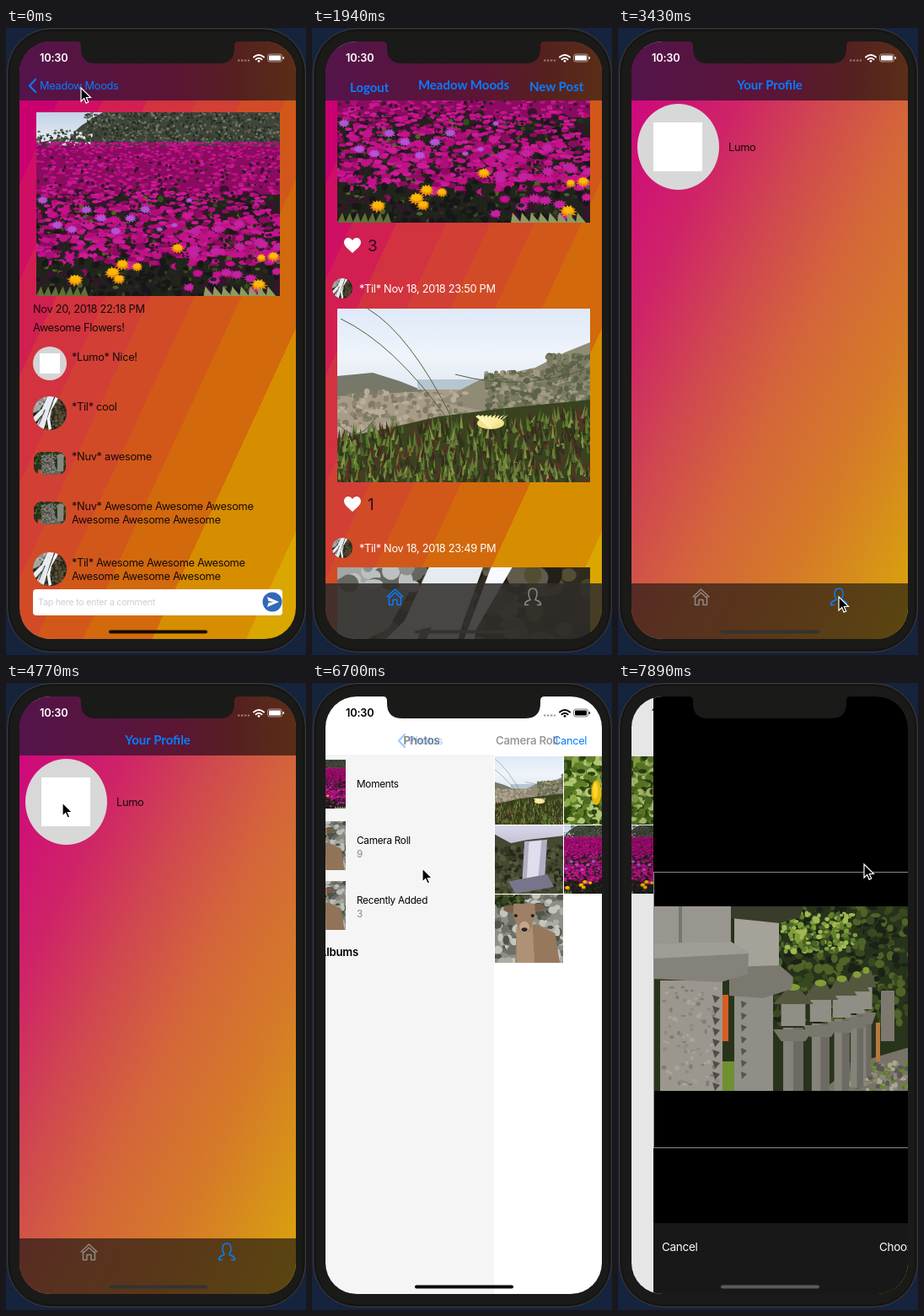
Write an HTML page with a canvas that moves like this. It is 356 px wide and 744 px high and loops after 8000 ms.

```html
<!DOCTYPE html>
<html lang="en">
<head>
<meta charset="utf-8">
<title>Photo app walkthrough</title>
<style>
html, body { margin: 0; width: 100%; height: 100%; overflow: hidden; background: #15233d; }
#stage { position: relative; width: 356px; height: 744px; overflow: hidden; font-family: Inter, Roboto, sans-serif; }
#stage div, svg, canvas { position: absolute; }
#stage div, svg { left: 0; top: 0; width: 356px; height: 744px; }
svg { overflow: visible; }
text { font-size: 12.8px; letter-spacing: -.3px; }
.bold { font-size: 13.2px; font-weight: 600; letter-spacing: -.2px; }
.row { font-size: 11.8px; }
.hand { font: 700 15px Lato, sans-serif; letter-spacing: 0; fill: #087cff; }
.blue { fill: #087cff; }
.mid { text-anchor: middle; }
.line { fill: none; stroke: currentColor; stroke-linecap: round; stroke-linejoin: round; }
.round { border-radius: 50%; }
.pill { border-radius: 9px; }

#screen { clip-path: inset(16px 12px 19px 16px round 37px); background: #000; }
#screen .view { clip-path: inset(16px 12px 0 16px); }
.warm { background: linear-gradient(to bottom right, #cb0070 12%, #cf0f63 0 20%, #d21f52 0 28%, #d2333f 0 37%, #d23f35 0 45%, #d24b27 0 53%, #d2581a 0 61.5%, #d2690c 0 74%, #d78d00 0 91%, #daa600 0) 16px 16px / 328px 709px no-repeat; }
.soft { background: linear-gradient(to bottom right, #cf0a7c 6%, #cf2368 24%, #d0484f 40%, #d4663a 56%, #d57a28 74%, #d9a80a) 16px 16px / 328px 709px no-repeat; }
.white { background: #fff; }

#feed, #detail, #profile, #back, #feedNav, #profNav, #tabs, #home, #user, #picker, #list, #roll, #listNav, #rollNav, #crop, #time, #icons, #bar, #cursor {
  animation: 8s step-end infinite;
}
#detail { animation-name: detail; }
#feed { animation-name: feed; }
#profile { animation-name: profile; }
#back { animation-name: back; }
#feedNav { animation-name: feedNav; }
#profNav { animation-name: profile; }
#tabs { animation-name: tabs; }
#home { animation-name: home; }
#user { animation-name: user; }
#picker { animation-name: picker; }
#list { animation-name: list; }
#roll { animation-name: roll; }
#listNav { animation-name: listNav; }
#rollNav { animation-name: rollNav; }
#crop { animation-name: crop; }
#time { animation-name: time; }
#icons { animation-name: icons; }
#bar { animation-name: bar; }
#cursor { animation-name: cursor; }

@keyframes detail {
  0% { transform: none; }
  18.6% { transform: translateX(28px); }
  20.45% { transform: translateX(215px); }
  22.3% { transform: translateX(308px); }
  24.2%, 100% { transform: translateX(340px); visibility: hidden; }
}
@keyframes feed {
  0%, 18.6% { transform: translateX(-90px); filter: brightness(.9); }
  20.45% { transform: translateX(-33px); filter: brightness(.95); }
  22.3% { transform: translateX(-6px); filter: none; }
  24.2%, 100% { transform: none; filter: none; }
}
@keyframes profile { 0% { visibility: hidden; } 42.8%, 100% { visibility: visible; } }
@keyframes back {
  0% { opacity: 1; transform: none; }
  18.6% { opacity: .4; transform: translateX(5px); }
  20.45%, 100% { opacity: 0; transform: translateX(40px); }
}
@keyframes feedNav {
  0% { opacity: 0; }
  18.6% { opacity: .05; }
  20.45% { opacity: .65; }
  22.3% { opacity: 1; }
  42.8%, 100% { opacity: 0; }
}
@keyframes tabs {
  0% { visibility: hidden; fill: rgba(48, 45, 43, .87); }
  18.6% { visibility: visible; fill: rgba(48, 45, 43, .87); }
  42.8%, 100% { visibility: visible; fill: rgba(30, 25, 20, .68); }
}
@keyframes home { 0% { color: #0a7cff; } 42.8%, 100% { color: #8f8983; } }
@keyframes user { 0% { color: #8f8983; } 42.8%, 100% { color: #0a7cff; } }
@keyframes picker {
  0% { visibility: hidden; }
  65.2% { visibility: visible; transform: translateY(640px); filter: none; }
  67.1% { visibility: visible; transform: translateY(270px); }
  68.85% { visibility: visible; transform: translateY(63px); }
  70.7% { visibility: visible; transform: translateY(8px); }
  72.6% { visibility: visible; transform: none; filter: none; }
  96.7% { visibility: visible; transform: translateX(-38px); filter: brightness(.96); }
  98.6%, 100% { visibility: visible; transform: translateX(-90px); filter: brightness(.9); }
}
@keyframes list {
  0% { transform: none; filter: none; }
  83.7% { transform: translateX(-38px); filter: brightness(.96); }
  85.6%, 100% { transform: translateX(-90px); filter: brightness(.9); }
}
@keyframes roll {
  0% { transform: translateX(340px); }
  83.7% { transform: translateX(200px); }
  85.6% { transform: translateX(26px); }
  87.45%, 100% { transform: none; }
}
@keyframes listNav {
  0% { opacity: 1; transform: none; }
  83.7% { opacity: .5; transform: translateX(-50px); }
  85.6%, 100% { opacity: 0; transform: translateX(-110px); }
}
@keyframes rollNav {
  0% { opacity: 0; transform: none; }
  83.7% { opacity: .4; transform: translateX(75px); }
  85.6% { opacity: .9; transform: translateX(10px); }
  87.45%, 100% { opacity: 1; transform: none; }
}
@keyframes crop {
  0% { transform: translateX(340px); }
  96.7% { transform: translateX(200px); }
  98.6%, 100% { transform: translateX(26px); }
}
@keyframes time { 0% { color: #fff; } 68.85% { color: #a2969d; } 70.7%, 100% { color: #000; } }
@keyframes icons { 0% { color: #fff; } 68.85% { color: #33232b; } 70.7%, 100% { color: #000; } }
@keyframes bar { 0% { fill: #140d05; } 18.6% { fill: #35332f; } 65.2% { fill: #0b0b0b; } 98.6%, 100% { fill: #5b5b5b; } }
@keyframes cursor {
  0% { transform: translate(89px, 71px); }
  1.8% { transform: translate(89px, 70px); }
  3.7% { transform: translate(89px, 68px); }
  24.2% { transform: translate(89px, 68px); opacity: 0; }
  26.1% { transform: translate(140px, 240px); opacity: 1; }
  27.95% { transform: translate(212px, 470px); }
  29.8% { transform: translate(254px, 632px); }
  31.6% { transform: translate(262px, 675px); }
  50.2% { transform: translate(252px, 656px); }
  52.1% { transform: translate(214px, 520px); }
  53.95% { transform: translate(152px, 338px); }
  55.8% { transform: translate(102px, 220px); }
  57.7% { transform: translate(75px, 160px); }
  59.6% { transform: translate(67px, 142px); }
  76.3% { transform: translate(94px, 166px); }
  78.2% { transform: translate(148px, 218px); }
  79.9% { transform: translate(131px, 220px); }
  91.1% { transform: translate(222px, 217px); }
  92.9%, 100% { transform: translate(292px, 215px); }
}
</style>
</head>
<body>
<div id="stage">
  <svg>
    <rect x="1.5" y=".5" width="354" height="740" rx="52" fill="#1a1a19" stroke="#3d3d3e"/>
    <rect x="4" y="3" width="349" height="735" rx="49" fill="none" stroke="#111"/>
  </svg>

  <div id="screen">
    <div id="feed" class="view warm">
      <canvas data-photo="flowers" data-box="30 5 300 226"></canvas>
      <canvas data-photo="beach" data-box="30 333 300 206"></canvas>
      <canvas data-photo="falls" data-box="30 640 300 206"></canvas>
      <canvas data-photo="falls" data-box="24 297 24 24" class="round"></canvas>
      <canvas data-photo="falls" data-box="24 605 24 24" class="round"></canvas>
      <svg>
        <defs><path id="heart" d="M48 267c-4-4-10-8-10-12.500c0-3.500 2.500-5.500 5-5.500s4 1.500 5 3c1-1.500 2.500-3 5-3s5 2 5 5.500c0 4.500-6 8.500-10 12.500z"/></defs>
        <g fill="#fff">
          <use href="#heart"/><use href="#heart" y="307"/>
          <text x="56" y="314">*Til* Nov 18, 2018 23:50 PM</text>
          <text x="56" y="622">*Til* Nov 18, 2018 23:49 PM</text>
        </g>
        <g fill="#2b0d18">
          <text x="66" y="265" style="font-size:19px">3</text>
          <text x="66" y="572" style="font-size:19px">1</text>
        </g>
      </svg>
    </div>

    <div id="detail" class="view warm">
      <canvas data-photo="flowers" data-box="36 100 289 218"></canvas>
      <canvas data-photo="falls" data-box="32 437 40 40" class="round"></canvas>
      <canvas data-photo="statue" data-box="33 503 38 27" class="pill"></canvas>
      <canvas data-photo="statue" data-box="33 562 38 27" class="pill"></canvas>
      <canvas data-photo="falls" data-box="32 622 40 40" class="round"></canvas>
      <svg>
        <circle cx="52" cy="398" r="20" fill="#d6d5d5"/>
        <rect x="40" y="386" width="24" height="24" fill="#fff"/>
        <g fill="#140a0a">
          <text x="32" y="338">Nov 20, 2018 22:18 PM</text>
          <text x="32" y="360">Awesome Flowers!</text>
          <text x="78" y="395">*Lumo* Nice!</text>
          <text x="78" y="454">*Til* cool</text>
          <text x="78" y="513">*Nuv* awesome</text>
          <text x="78" y="572">*Nuv* Awesome Awesome Awesome</text>
          <text x="78" y="588">Awesome Awesome Awesome</text>
          <text x="78" y="639">*Til* Awesome Awesome Awesome</text>
          <text x="78" y="655">Awesome Awesome Awesome</text>
        </g>
        <rect x="32" y="666" width="296" height="31" rx="4" fill="#fff"/>
        <text x="38" y="685" fill="#c8d0d8" style="font-size:10.800px">Tap here to enter a comment</text>
        <circle cx="316" cy="681" r="11.500" fill="#3268b8"/>
        <path d="M310 675l14 6-14 6 1.500-5 6-1-6-1z" fill="#fff"/>
      </svg>
    </div>

    <div id="profile" class="view soft">
      <svg>
        <ellipse cx="71.500" cy="141" rx="48.500" ry="51" fill="#d8d8d8"/>
        <rect x="42" y="112" width="58" height="58" fill="#fff"/>
        <text x="131" y="146" fill="#140a0a">Lumo</text>
      </svg>
    </div>

    <svg>
      <defs>
        <linearGradient id="navFill">
          <stop stop-color="#54144b"/><stop offset=".55" stop-color="#5b1535"/><stop offset=".8" stop-color="#55211f"/><stop offset="1" stop-color="#5a2e18"/>
        </linearGradient>
      </defs>
      <rect x="16" y="16" width="328" height="70" fill="url(#navFill)"/>
      <g id="back">
        <path class="line" d="M35 61l-7 7.500 7 7.500" stroke-width="2.200" style="color:#087cff"/>
        <text class="blue" x="40" y="73">Meadow Moods</text>
      </g>
      <g id="feedNav">
        <text class="hand" x="45" y="76">Logout</text>
        <text class="hand mid" x="180" y="73">Meadow Moods</text>
        <text class="hand" x="258" y="75">New Post</text>
      </g>
      <g id="profNav"><text class="hand mid" x="180" y="73">Your Profile</text></g>
      <g id="tabs">
        <rect x="16" y="659" width="328" height="66"/>
        <g id="home" class="line" stroke-width="1.500"><path d="M89 675l9.500-9 9.500 9M91.500 675v9.500h4.500v-6h5v6h4.500v-9.500M92 676l6.500-6 6.500 6"/></g>
        <g id="user" class="line" stroke-width="1.500"><path d="M252.500 684.500c0-4 3-5 6.500-6c0-1.500-2-3-2-7c0-4 2-6.500 5-6.500s5 2.500 5 6.500c0 4-2 5.500-2 7c3.500 1 6.500 2 6.500 6M252.500 684.500h4M267.500 684.500h4"/></g>
      </g>
    </svg>

    <div id="picker" class="view white">
      <div id="list" class="view white">
        <canvas data-photo="flowers" data-box="23 91 55 58"></canvas>
        <canvas data-photo="deer" data-box="23 164 55 58"></canvas>
        <canvas data-photo="deer" data-box="23 235 55 58"></canvas>
        <svg>
          <text class="row" x="91" y="124">Moments</text>
          <text class="row" x="91" y="191">Camera Roll</text>
          <text class="row" x="91" y="262">Recently Added</text>
          <g fill="#8e8e93"><text class="row" x="91" y="207">9</text><text class="row" x="91" y="278">3</text></g>
          <text class="bold" x="23" y="324">My Albums</text>
          <path class="line" style="color:#c5c5c9" stroke-width="1.300" d="M323 117l4 4.500-4 4.500M323 190l4 4.500-4 4.500M323 261l4 4.500-4 4.500"/>
        </svg>
      </div>
      <div id="roll" class="view white"></div>
      <svg>
        <rect x="16" y="16" width="328" height="69" fill="#fff"/>
        <g id="listNav"><text class="bold mid" x="180" y="73">Photos</text></g>
        <g id="rollNav">
          <path class="line" d="M35 61l-7 7.500 7 7.500" stroke-width="2.200" style="color:#087cff"/>
          <text class="blue" x="40" y="73">Photos</text>
          <text class="bold mid" x="180" y="73">Camera Roll</text>
        </g>
        <text class="blue" x="286" y="73">Cancel</text>
      </svg>
    </div>

    <div id="crop" class="view" style="background:#000">
      <canvas data-photo="lanterns" data-box="16 265 328 219"></canvas>
      <svg>
        <rect x="16.500" y="224.500" width="327" height="327" fill="none" stroke="#8a8a8a"/>
        <rect x="16" y="641" width="328" height="84" fill="#181818"/>
        <g fill="#fff"><text x="26" y="674" style="font-size:13.500px">Cancel</text><text x="284" y="674" style="font-size:13.500px">Choose</text></g>
      </svg>
    </div>

    <svg>
      <g id="time"><text class="bold" x="40" y="40" fill="currentColor" style="font-size:12.800px">10:30</text></g>
      <g id="icons">
        <path d="M275 38.500h14" stroke="currentColor" opacity=".4" stroke-width="2" stroke-dasharray="2.500 1.500"/>
        <path class="line" stroke-width="2" d="M294 34.500q6-5 12 0M296.500 37.200q3.500-2.800 7 0"/>
        <circle cx="300" cy="39.300" r="1.400" fill="currentColor"/>
        <rect x="310.500" y="31" width="17" height="9" rx="2.500" fill="none" stroke="currentColor" opacity=".5"/>
        <rect x="312" y="32.500" width="14" height="6" rx="1" fill="currentColor"/>
        <rect x="328.500" y="34" width="1.500" height="3" rx=".7" fill="currentColor"/>
      </g>
      <rect id="bar" x="122" y="714.500" width="117" height="4" rx="2"/>
    </svg>
  </div>

  <svg>
    <path d="M84 15v1q5 0 5 5v3q0 18 18 18h146q18 0 18-18v-3q0-5 5-5v-1z" fill="#1a1a19"/>
    <path id="cursor" d="M0 0v16l3.700-3.500 2.400 5.600 2.600-1.100-2.400-5.500h5.200z" fill="#000" stroke="#fff" stroke-width="1.200"/>
  </svg>
</div>

<script>
let g, seed;
const rnd = () => (seed = (seed * 16807) % 2147483647) / 2147483647;
const span = (a, b) => a + (b - a) * rnd();
const pick = list => list[Math.floor(rnd() * list.length)];

function box(c, x, y, w, h) { g.fillStyle = c; g.fillRect(x, y, w, h); }
function dot(c, x, y, rx, ry = rx) {
  g.fillStyle = c;
  g.beginPath();
  g.ellipse(x, y, rx, ry, 0, 0, 7);
  g.fill();
}
function poly(c, ...p) {
  g.fillStyle = c;
  g.beginPath();
  for (let i = 0; i < p.length; i += 2) g.lineTo(p[i], p[i + 1]);
  g.fill();
}
function fade(w, h, ...colors) {
  const f = g.createLinearGradient(0, 0, 0, h);
  colors.forEach((c, i) => f.addColorStop(i / (colors.length - 1), c));
  box(f, 0, 0, w, h);
}
function specks(n, colors, x, y, w, h, r) {
  while (n--) dot(pick(colors), x + w * rnd(), y + h * rnd(), span(r / 2, r), span(r / 3, r));
}
// Spiky flower head seen at a slant
function bloom(c, x, y, r) {
  const p = [];
  for (let i = 0; i < 22; i++) {
    const a = i * Math.PI / 11, d = i % 2 ? r * .6 : r * span(.85, 1.1);
    p.push(x + Math.cos(a) * d, y + Math.sin(a) * d * .7);
  }
  poly(c, ...p);
}

const magenta = ['#c4128c', '#ad0e78', '#cb1c96', '#8a0c5f', '#bf1285'];
const leaf = ['#26311c', '#39491f', '#4f6328', '#1b2215'];
const stone = ['#8b8982', '#6e6d67', '#a3a098', '#55564f'];

// Each photo: width, height, painter
const photos = {
  flowers: [300, 226, () => {
    box('#22211d', 0, 0, 300, 226);
    fade(300, 50, '#c3d3e8', '#eef2f7');
    poly('#3f4639', 0, 38, 40, 30, 56, 16, 82, 0, 300, 0, 300, 60, 0, 60);
    specks(900, ['#2c332a', '#59604f', '#394033', '#737a68', '#222a22'], 60, 0, 240, 38, 2);
    specks(160, ['#2c332a', '#59604f', '#e3e8ec'], 0, 22, 70, 20, 2);
    box('#8a0b60', 0, 41, 300, 60);
    specks(300, leaf, 0, 105, 300, 121, 4);
    specks(260, ['#171719', '#22261c', '#3a1230'], 0, 95, 300, 131, 6);
    for (let i = 0; i < 1700; i++) {
      const d = rnd() ** 1.7, r = 1.6 + d * 3;
      dot(pick(magenta), 300 * rnd(), 37 + 150 * d, r * 1.3, r * .65);
    }
    specks(280, ['#3d0d30', '#2a1022', '#262b1e'], 0, 55, 300, 130, 2.5);
    for (let i = 0; i < 45; i++) bloom(pick(magenta), 300 * rnd(), span(120, 200), 8);
    for (let i = 0; i < 16; i++) bloom('#c322a0', span(185, 300), span(130, 222), 9);
    for (let i = 0; i < 11; i++) bloom('#b552d6', 8 + 18 * i, 108 + 38 * Math.abs(Math.sin(i * 2.2)), i < 8 ? 8 : 5);
    specks(120, ['#171719', '#20261a'], 0, 180, 220, 46, 5);
    for (const [x, y, r] of [[94, 197, 11], [106, 187, 10], [102, 205, 9], [124, 190, 8], [48, 206, 11], [174, 167, 9], [274, 212, 11], [292, 177, 9], [277, 179, 7]]) {
      bloom('#e58a08', x, y + 1, r);
      bloom('#ffb70a', x, y - 1, r * .8);
    }
    for (let x = 206; x < 290; x += 11) poly('#8f9a62', x, 226, x + 2, 214, x + 12, 226);
    for (let x = 0; x < 60; x += 9) poly('#5f7334', x, 226, x + 6, 214, x + 10, 226);
  }],
  beach: [300, 206, () => {
    fade(300, 110, '#dfe9f9', '#eff4fa', '#dce5ee');
    box('#a79c88', 0, 96, 300, 110);
    poly('#77786a', 0, 80, 42, 76, 74, 86, 104, 98, 0, 104);
    box('#b5c6d2', 95, 84, 75, 12);
    poly('#8f8b75', 120, 110, 170, 84, 235, 70, 270, 52, 300, 40, 300, 150);
    specks(420, ['#6f7458', '#7c7a62', '#5d6348', '#a19a84'], 175, 74, 125, 50, 4);
    specks(150, ['#7c7a62', '#5d6348'], 250, 55, 50, 30, 4);
    specks(200, ['#7e7a63', '#b9ad99', '#8f8672'], 0, 98, 160, 50, 4);
    poly('#3a421f', 0, 154, 60, 142, 120, 128, 200, 118, 300, 108, 300, 206, 0, 206);
    for (let i = 0; i < 800; i++) {
      const x = 300 * rnd(), y = span(126 + 26 * (1 - x / 300), 215), t = span(-5, 5);
      poly(pick(['#5f7c2b', '#4d692a', '#809440', '#2b3618', '#5c2f28', '#3b2a20', '#6d7d3c']), x - 2, y, x + t, y - span(8, 20), x + 2, y);
    }
    dot('#f3e28a', 182, 136, 16, 7);
    for (let x = 164; x < 202; x += 5) poly('#fff4b5', x, 128, 182, 143, x + 4, 126);
    g.strokeStyle = '#4f5f42';
    [[4, 12, 130], [36, 0, 136], [300, 70, 140], [0, 135, 45]].forEach(([x, y, end]) => {
      g.beginPath(); g.moveTo(x, y); g.quadraticCurveTo((x + end) / 2, y + 30, end, x > 99 ? 78 : 130); g.stroke();
    });
  }],
  leaves: [300, 300, () => {
    fade(300, 300, '#718a38', '#3c5517');
    specks(340, ['#8fa84c', '#4c6c20', '#2d4312', '#b0c676', '#5f7f25'], 0, 0, 300, 300, 20);
    dot('#e9b80c', 142, 160, 22, 54);
    dot('#ffd62e', 138, 150, 11, 36);
  }],
  river: [300, 300, () => {
    fade(300, 170, '#f0d9b5', '#fff1d5', '#9caaa7');
    poly('#513c22', 0, 0, 110, 0, 140, 60, 210, 96, 300, 100, 300, 135, 0, 150);
    box('#c3cac8', 120, 98, 14, 48);
    poly('#788484', 0, 145, 300, 135, 300, 205, 0, 190);
    poly('#382b14', 0, 150, 90, 165, 180, 205, 300, 190, 300, 300, 0, 300);
    specks(190, ['#55471a', '#2b210f', '#6d6729', '#47330f'], 0, 180, 300, 120, 12);
  }],
  falls: [300, 300, () => {
    box('#2f2c1e', 0, 0, 300, 300);
    specks(260, ['#474427', '#211f17', '#544d31', '#605b4a'], 0, 0, 300, 300, 16);
    poly('#a3a6a4', 0, 0, 130, 0, 60, 120, 0, 150);
    specks(60, ['#8d8f8b', '#bcc0c0', '#65665f'], 0, 0, 100, 70, 12);
    poly('#e6ebf2', 130, 0, 190, 0, 150, 110, 120, 210, 95, 300, 40, 300, 85, 160, 20, 230, 0, 230, 0, 190, 80, 110);
    poly('#f8faff', 200, 0, 235, 0, 165, 120, 150, 200, 165, 290, 140, 300, 125, 200);
    poly('#dfe6ee', 85, 170, 110, 150, 70, 300, 0, 300);
    poly('#57564c', 100, 120, 112, 118, 60, 240, 40, 270);
  }],
  cascade: [300, 300, () => {
    fade(300, 140, '#d7d8e9', '#b4b1c6');
    poly('#454832', 0, 40, 70, 78, 140, 64, 300, 45, 300, 300, 0, 300);
    specks(190, ['#333824', '#565a3d', '#292719'], 0, 90, 300, 210, 13);
    poly('#b3aec3', 130, 70, 230, 62, 220, 220, 120, 245);
    poly('#e0ddec', 150, 72, 205, 66, 190, 235, 140, 235);
    poly('#77758a', 60, 245, 230, 215, 260, 270, 90, 300);
  }],
  statue: [300, 226, () => {
    box('#28301f', 0, 0, 300, 226);
    specks(150, leaf, 0, 0, 300, 140, 14);
    box('#65655d', 40, 170, 215, 56);
    poly('#74746d', 75, 180, 85, 90, 110, 40, 150, 25, 185, 55, 190, 120, 220, 180);
    specks(200, [...stone, '#3a3b35'], 70, 30, 130, 180, 8);
    dot('#353730', 132, 76, 8, 6);
    poly('#4c4d47', 100, 105, 150, 100, 145, 120, 110, 122);
    poly('#868680', 208, 40, 252, 22, 292, 40, 280, 56, 278, 190, 220, 190, 220, 56);
    box('#d54a20', 38, 180, 30, 46);
  }],
  lanterns: [328, 219, () => {
    box('#28331c', 0, 0, 328, 219);
    specks(520, leaf, 120, 0, 208, 140, 6);
    specks(190, ['#809d3a', '#5f822c', '#a1b952', '#48642a'], 152, 8, 88, 46, 4);
    box('#7d796e', 270, 100, 16, 60);
    poly('#777369', 200, 219, 240, 186, 328, 160, 328, 219);
    specks(160, ['#aba498', '#5b5950', '#8d877b', '#688334'], 225, 185, 103, 34, 4);
    for (let i = 4; i >= 0; i--) {
      const x = 166 + i * 36 - i * i * 3.6, w = 24 - i * 3, top = 104 - i * 5;
      box('#85827a', x - w / 2, top + 40, w, 110 - i * 8);
      box('#6c6a62', x, top + 40, w / 2, 110 - i * 8);
      box('#918e85', x - w * .6, top + 8, w * 1.2, 30);
      poly('#55573f', x - w, top + 12, x - 6, top - 8, x + 6, top - 8, x + w, top + 12);
      poly('#78776b', x - w, top + 42, x + w, top + 42, x + w * .6, top + 56, x - w * .6, top + 56);
      dot('#839d35', x, top - 8, 8 - i, 4);
    }
    box('#b9793d', 264, 138, 5, 46);
    box('#d95c24', 82, 105, 7, 55);
    box('#6f9131', 80, 184, 16, 35);
    box('#918e88', 96, 105, 46, 114);
    box('#a5a29a', 96, 8, 53, 64);
    poly('#393c29', 92, 0, 178, 0, 174, 13, 150, 20, 92, 14);
    poly('#7b796f', 90, 72, 150, 70, 166, 84, 164, 98, 130, 109, 90, 106);
    box('#9b978e', 8, 88, 74, 131);
    box('#999690', 0, 0, 92, 46);
    box('#77756f', 30, 0, 4, 44);
    poly('#84827a', 0, 44, 92, 42, 113, 56, 112, 80, 80, 90, 0, 86);
    poly('#a09d96', 0, 44, 92, 42, 113, 56, 0, 62);
    specks(90, ['#a9a59b', '#8d8a82', '#7f7c74'], 12, 92, 64, 124, 3);
    for (let y = 105; y < 210; y += 13) poly('#4f4d48', 70, y, 79, y + 3, 73, y + 10);
    for (let y = 112; y < 205; y += 14) poly('#57554f', 104, y, 111, y + 3, 105, y + 9);
  }],
  deer: [300, 300, () => {
    box('#8d8e88', 0, 0, 300, 300);
    specks(150, ['#adada6', '#6d6f68', '#c5c5be', '#4f5546'], 0, 0, 300, 300, 22);
    specks(70, leaf, 0, 0, 130, 50, 14);
    poly('#96785d', 95, 150, 180, 130, 265, 170, 285, 300, 90, 300);
    poly('#ae9277', 95, 140, 165, 140, 175, 300, 95, 300);
    dot('#7a604c', 68, 62, 30, 17);
    dot('#7a604c', 190, 58, 30, 17);
    poly('#9d8065', 82, 40, 175, 40, 178, 95, 150, 165, 112, 165, 80, 95);
    dot('#c2a78e', 130, 142, 22, 24);
    dot('#231b16', 92, 93, 8, 7);
    dot('#231b16', 166, 93, 8, 7);
    dot('#2d2520', 130, 154, 13, 9);
  }]
};

const roll = document.getElementById('roll');
['beach', 'leaves', 'river', 'falls', 'cascade', 'flowers', 'statue', 'lanterns', 'deer'].forEach((name, i) => {
  const c = document.createElement('canvas');
  c.dataset.photo = name;
  c.dataset.box = [Math.round(16.5 + i % 4 * 82.4), Math.round(86.5 + Math.floor(i / 4) * 82.4), 81, 81].join(' ');
  roll.append(c);
});

for (const c of document.querySelectorAll('canvas')) {
  const [x, y, w, h] = c.dataset.box.split(' ').map(Number);
  const [pw, ph, draw] = photos[c.dataset.photo];
  const s = Math.max(w / pw, h / ph);
  c.width = w;
  c.height = h;
  c.style.left = x + 'px';
  c.style.top = y + 'px';
  g = c.getContext('2d');
  g.translate((w - pw * s) / 2, (h - ph * s) / 2);
  g.scale(s, s);
  seed = 4711;
  draw();
}
</script>
</body>
</html>
```
